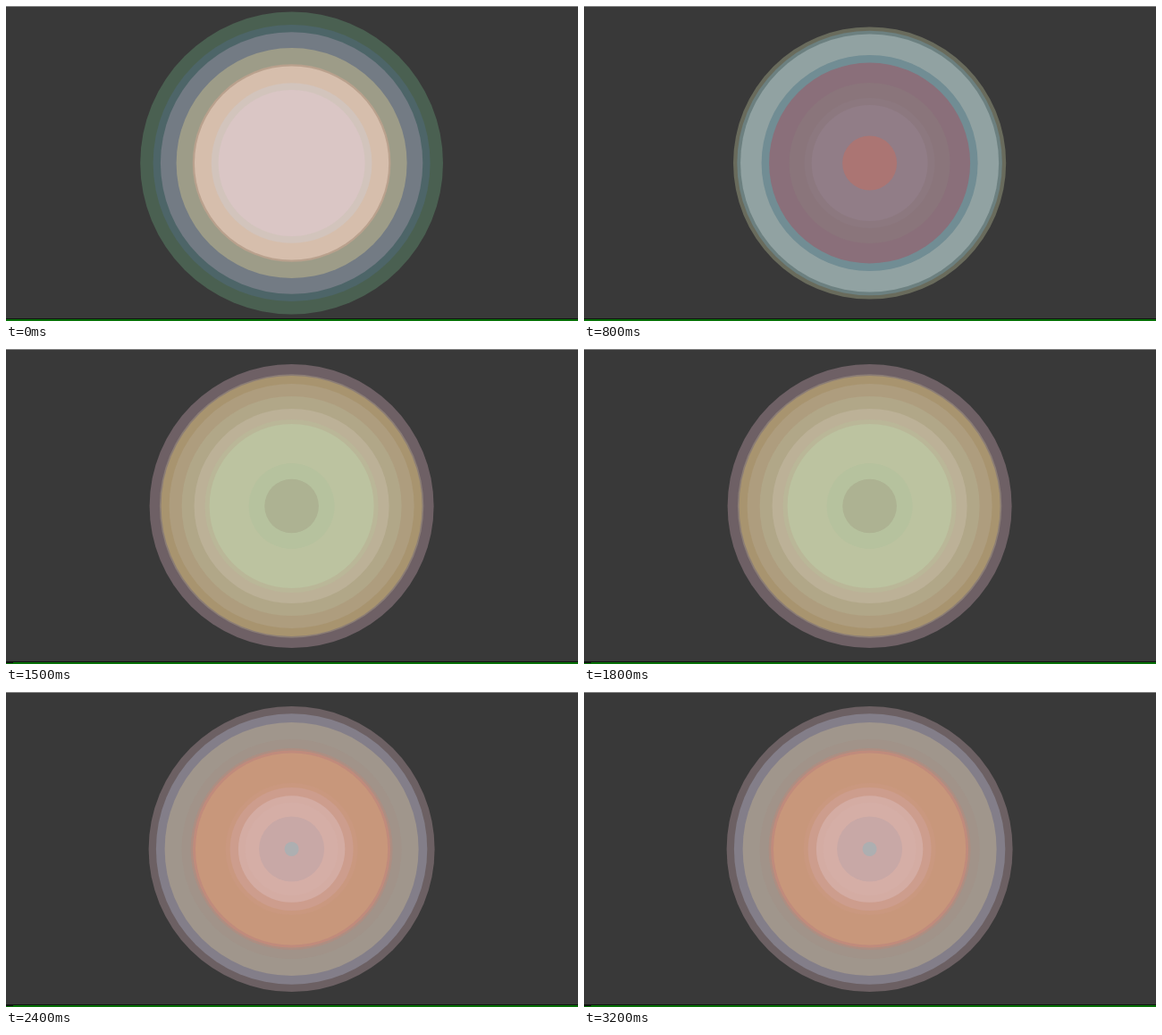
An HTML page with a canvas that plays this animation: 640 px wide and 353 px high, repeating every 3.3 s.

```html
<!DOCTYPE html>
<html lang="en">
<head>
<meta charset="utf-8">
<title>Concentric discs</title>
<style>
html, body { margin: 0; width: 100%; height: 100%; overflow: hidden; background: #393939; }
canvas { display: block; }
</style>
</head>
<body>
<canvas id="stage" width="640" height="353"></canvas>
<script>
const ctx = document.getElementById('stage').getContext('2d');
const LOOP = 3300;
const CX = 319.6, CY = 176;

// Each scene holds from its start time; rings run from the outside in.
const scenes = [
  { start: 0, gap: 0, rings: [
    [169.4, '#4a6051'], [155, '#4d6568'], [146.7, '#737b84'], [129, '#9d9c88'],
    [110.8, '#b9a18d'], [108.6, '#d6beac'], [89.8, '#d2c4bc'], [82, '#dac6c5']
  ] },
  { start: 800, gap: 0, rings: [
    [152.6, '#696b5c'], [148.3, '#6c8080'], [144.5, '#91a2a2'], [121, '#718d94'],
    [112.5, '#8a6f7a'], [90, '#8a757b'], [73, '#8c787f'], [65, '#917d87'],
    [30.5, '#ab7573']
  ] },
  { start: 1500, gap: 8, rings: [
    [159, '#6e6065'], [147.7, '#8b7d75'], [146, '#a8946f'], [137, '#ae9d7e'],
    [123, '#b1a788'], [109, '#bcb197'], [97, '#bab798'], [92, '#bcc3a0'],
    [48, '#b6c29e'], [30.3, '#adb292']
  ] },
  { start: 2400, gap: 8, rings: [
    [160, '#6c6063'], [151.7, '#837e89'], [142, '#a0968c'], [123, '#a19389'],
    [113, '#ad8e82'], [110.5, '#c08b7c'], [107.6, '#c8977b'], [74, '#ca987f'],
    [69, '#cd9d8d'], [59.7, '#d4aca3'], [52, '#d5aea6'], [36.5, '#c8a8a6'],
    [8, '#adafb1']
  ] }
];

function bar(x, y, w, h, color) {
  ctx.fillStyle = color;
  ctx.fillRect(x, y, w, h);
}

function disc(radius, color) {
  ctx.fillStyle = color;
  ctx.beginPath();
  ctx.arc(CX, CY, radius, 0, Math.PI * 2);
  ctx.fill();
}

function draw(scene) {
  bar(0, 0, 640, 353, '#393939');
  bar(0, 0, 640, 1, '#858585');
  bar(0, 350, 640, 1, '#101410');
  bar(0, 351, 640, 2, '#087008');
  bar(0, 351, scene.gap, 1, '#101410');
  for (const [radius, color] of scene.rings) disc(radius, color);
}

const origin = performance.now();

function tick() {
  const t = (performance.now() - origin) % LOOP;
  draw(scenes.findLast(s => s.start <= t) || scenes[0]);
  requestAnimationFrame(tick);
}

tick();
</script>
</body>
</html>
```
